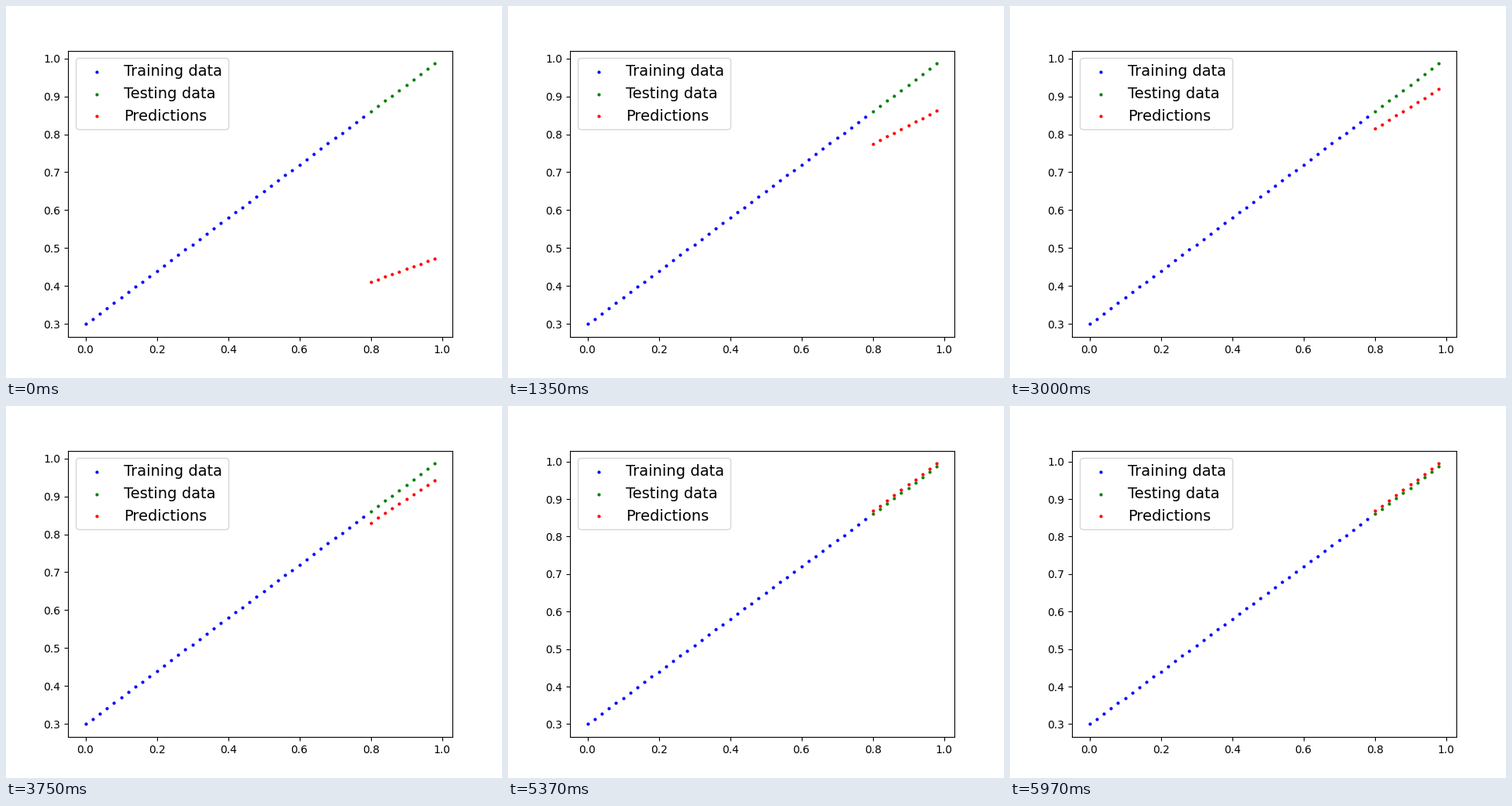
Animation of 640 by 480 pixels, one loop 6 s. Source, as a matplotlib script:

```python
import matplotlib.pyplot as plt
import numpy as np
from matplotlib.animation import FuncAnimation

FRAMES, INTERVAL = 200, 30
RATE = 0.01
MARGIN = 0.05

x = np.arange(50) * 0.02
y = 0.7 * x + 0.3
x_train, y_train = x[:40], y[:40]
x_test, y_test = x[40:], y[40:]


def train(epochs, weight=0.33669037, bias=0.12880941):
    """Gradient descent on mean absolute error; yields the test predictions."""
    for _ in range(epochs):
        sign = np.sign(weight * x_train + bias - y_train)
        weight -= RATE * np.mean(sign * x_train)
        bias -= RATE * np.mean(sign)
        yield weight * x_test + bias


predictions = list(train(FRAMES))

plt.rcParams["font.family"] = "DejaVu Sans"
fig, ax = plt.subplots(figsize=(6.4, 4.8), dpi=100)
ax.scatter(x_train, y_train, c="b", s=4, label="Training data")
ax.scatter(x_test, y_test, c="g", s=4, label="Testing data")
dots = ax.scatter(x_test, predictions[0], c="r", s=4, label="Predictions")
ax.legend(loc="upper left", prop={"size": 14})


def padded(low, high):
    pad = MARGIN * (high - low)
    return low - pad, high + pad


ax.set_xlim(*padded(x[0], x[-1]))


def update(frame):
    pred = predictions[frame]
    dots.set_offsets(np.column_stack([x_test, pred]))
    ax.set_ylim(*padded(y[0], max(y[-1], pred.max())))
    return (dots,)


anim = FuncAnimation(fig, update, frames=FRAMES, interval=INTERVAL,
                     init_func=lambda: update(0), repeat=True, repeat_delay=0)
plt.show()
```
